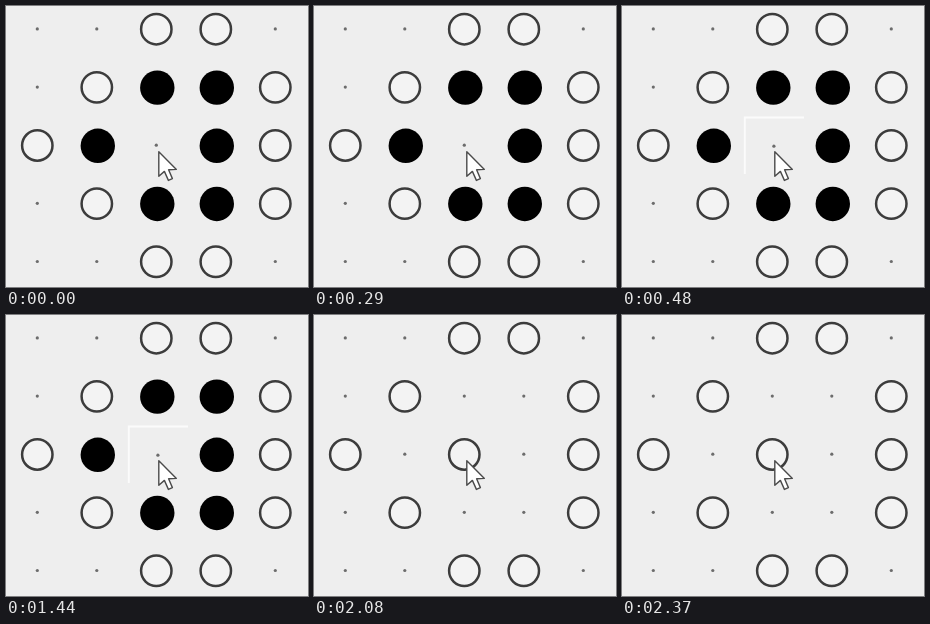
Write an HTML page that moves like this. It is 302x281 px and loops after 2.56 s.

```html
<!DOCTYPE html>
<html lang="en">
<head>
<meta charset="utf-8">
<title>Stone capture</title>
<style>
  html, body { margin: 0; width: 100%; height: 100%; overflow: hidden; background: #eee; }
  svg { display: block; width: 100%; height: 100%; }
  .soft { filter: blur(0.65px); }
  .dot { fill: #6c6c6c; }
  .white { fill: #f3f3f3; stroke: #3c3c3c; stroke-width: 2.5; }
  .black { fill: #000; }
  .edge { fill: none; stroke: #fbfbfb; stroke-width: 2; }
  .cursor { fill: #fff; stroke: #4a4a4a; stroke-width: 1.4; stroke-linejoin: round; }
</style>
</head>
<body>
<svg viewBox="0 0 302 281">
  <g class="soft">
    <g id="board"></g>
    <g id="idle"></g>
    <g id="pressed"><path class="edge" d="M122.8 168V111.5H182"/></g>
    <g id="stones"></g>
    <g id="captured"></g>
    <path class="cursor" d="M152.8 145.8V170.2L158.4 165.4L162.4 174.4L166.4 172.6L162.6 163.8L170.4 163.4Z"/>
  </g>
</svg>
<script>
const LOOP = 2560, PRESS = 480, CAPTURE = 2080;
const LEFT = 31.3, TOP = 23.2, DX = 59.5, DY = 58.15;
const LAYOUT = ["..oo.", ".oxxo", "ox*xo", ".oxxo", "..oo."];

const layer = id => document.getElementById(id);

function circle(parent, type, cx, cy, r) {
  const el = document.createElementNS("http://www.w3.org/2000/svg", "circle");
  const attrs = { class: type, cx, cy, r };
  for (const key in attrs) el.setAttribute(key, attrs[key]);
  layer(parent).append(el);
}

const dot = (parent, x, y) => circle(parent, "dot", x, y - 0.3, 1.6);
const white = (parent, x, y) => circle(parent, "white", x, y, 15.2);

LAYOUT.forEach((row, j) => [...row].forEach((cell, i) => {
  const x = LEFT + i * DX, y = TOP + j * DY;
  if (cell === ".") dot("board", x, y);
  if (cell === "o") white("board", x, y);
  if (cell === "x") {
    circle("stones", "black", x + 1, y + 0.3, 17.2);
    dot("captured", x, y);
  }
  if (cell === "*") {
    dot("idle", x, y);
    dot("pressed", x + 1.6, y + 1);
    white("captured", x, y);
  }
}));

// Each layer is visible from one time up to another.
const STEPS = [
  ["idle", 0, PRESS],
  ["pressed", PRESS, CAPTURE],
  ["stones", 0, CAPTURE],
  ["captured", CAPTURE, LOOP]
];

function draw(now) {
  const t = now % LOOP;
  for (const [id, from, to] of STEPS)
    layer(id).setAttribute("visibility", t >= from && t < to ? "visible" : "hidden");
}

const start = performance.now();
function tick() {
  draw(performance.now() - start);
  requestAnimationFrame(tick);
}
tick();
</script>
</body>
</html>
```
